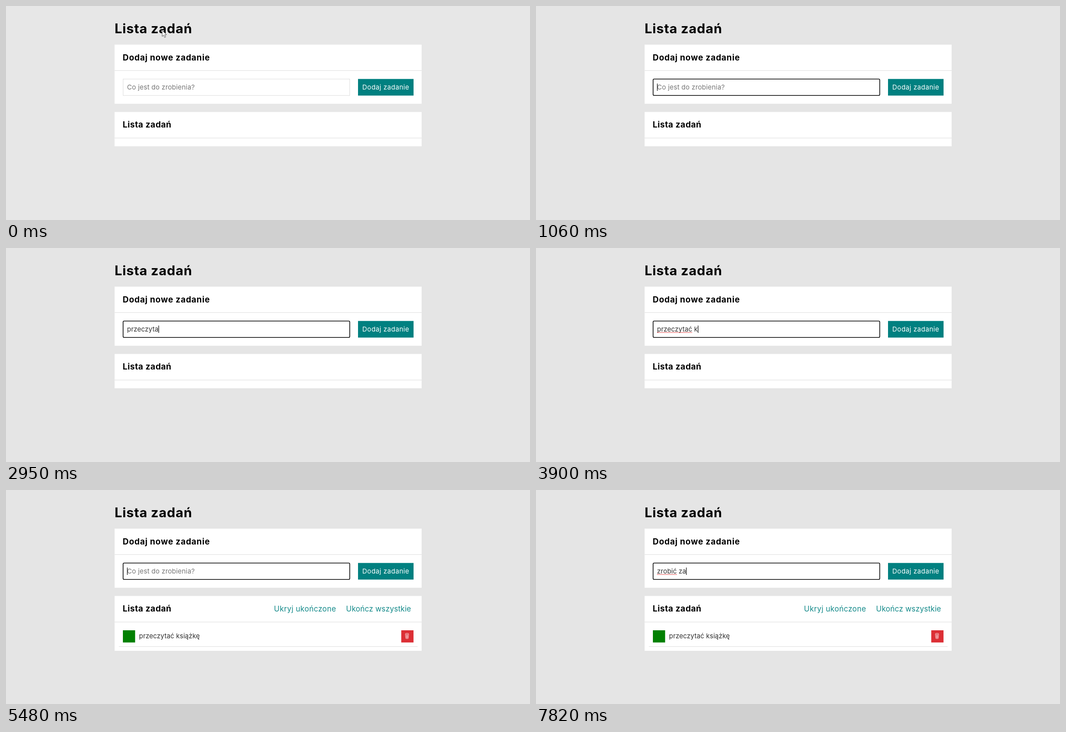
Write an HTML page that moves like this. It is 1170x479 px and loops after 7990 ms.

```html
<!DOCTYPE html>
<html lang="pl">
<head>
<meta charset="utf-8">
<title>Lista zadań</title>
<style>
  html, body { margin: 0; width: 100%; height: 100%; overflow: hidden; background: #e5e5e5; }
  svg { display: block; width: 1170px; height: 479px; }
  text { font: 14.8px Inter, "Noto Sans", sans-serif; font-optical-sizing: none; white-space: pre; }
  .h1, .h2 { font-weight: 700; }
  .h1 { font-size: 29.6px; letter-spacing: .026em; }
  .h2 { font-size: 18.6px; letter-spacing: .026em; }
  .wide { letter-spacing: .038em; }
  .hint { fill: #757575; letter-spacing: .014em; }
  .button { fill: #fff; letter-spacing: .028em; }
  .entry { fill: #333; letter-spacing: .005em; }
  .link { fill: #148a8a; font-size: 16.8px; letter-spacing: .007em; }
  .link.wide { letter-spacing: .022em; }
  .rule { stroke: #ddd; }
</style>
</head>
<body>
<svg viewBox="0 0 1170 479">
  <rect id="page" width="1170" height="479"/>
  <text class="h1" x="242.5" y="60.5">Lista zadań</text>

  <rect x="242.5" y="86.5" width="685.5" height="132.3" fill="#fff"/>
  <text class="h2 wide" x="260.5" y="121.5">Dodaj nowe zadanie</text>
  <path class="rule" d="M242.5 144.5H928"/>
  <rect id="field" x="261.5" y="163.5" width="506" height="36.8" fill="#fff"/>
  <text id="hint" class="hint" x="270.3" y="187.2">Co jest do zrobienia?</text>
  <text id="entry" class="entry" x="270.3" y="187.2"></text>
  <path id="spelling" stroke="#d22" stroke-width="1.2" stroke-dasharray="2 1"/>
  <rect id="caret" y="173.6" width="1.2" height="16.4"/>
  <rect x="786" y="163.3" width="124" height="37.2" fill="#008080"/>
  <text class="button" x="795.5" y="187.2">Dodaj zadanie</text>

  <rect id="list" x="242.5" y="237.2" width="685.5" fill="#fff"/>
  <text class="h2" x="260.5" y="272">Lista zadań</text>
  <path class="rule" d="M242.5 295.5H928"/>
  <g id="task">
    <text class="link wide" x="598.3" y="271.5">Ukryj ukończone</text>
    <text class="link" x="759.3" y="271.5">Ukończ wszystkie</text>
    <rect x="261" y="314" width="27.3" height="27.3" fill="#008000"/>
    <text class="entry" x="297" y="332.2">przeczytać książkę</text>
    <rect x="882.5" y="314" width="27.4" height="27.3" fill="#dc2f35"/>
    <g fill="none" stroke="#fff" stroke-width=".8">
      <ellipse cx="895.4" cy="322.2" rx="3.9" ry="1.3"/>
      <path d="M891.7 323l1 9.3q2.7 1.2 5.4 0l1-9.3M894.2 324l.3 8M896.6 324l-.3 8M892.3 326.6h6.2M892.6 329.4h5.6" stroke-opacity=".85"/>
    </g>
    <path class="rule" d="M252 350.5H919"/>
  </g>
  <path id="pointer" d="M348.8 54.6v13.5l3.1-2.9 2.3 5.2 2.4-1.1-2.3-5h4.3z" fill="#fff" stroke="#444" stroke-width=".9"/>
</svg>
<script>
  const LOOP = 7990;
  const FOCUS = 1060;
  const SUBMIT = 5480;
  const LEFT = 270.3;
  const BLINKS = [[1560, 1700], [6030, 6300]];
  const PHRASES = [
    { text: "przeczytać książkę", from: 0, to: SUBMIT, spellAt: 3670,
      keys: [1700, 1830, 1960, 2120, 2280, 2440, 2620, 2790, 2950, 3350, 3510,
             3830, 3990, 4160, 4320, 4480, 4720, 5050] },
    { text: "zrobić za", from: SUBMIT, to: LOOP, spellAt: 7580,
      keys: [6300, 6475, 6650, 6825, 7000, 7340, 7460, 7700, 7820] }
  ];

  const el = id => document.getElementById(id);
  const set = (id, attrs) => {
    for (const name in attrs) el(id).setAttribute(name, attrs[name]);
  };
  const show = (id, visible) => set(id, { visibility: visible ? "visible" : "hidden" });

  function drawField(focused) {
    set("field", focused
      ? { rx: 2.2, stroke: "#000", "stroke-width": 1.6 }
      : { rx: 0, stroke: "#ddd", "stroke-width": 1 });
  }

  function drawEntry(t) {
    const phrase = PHRASES.find(p => t >= p.from && t < p.to);
    const typed = phrase.text.slice(0, phrase.keys.filter(k => k <= t).length);
    const entry = el("entry");
    if (entry.textContent !== typed) entry.textContent = typed;
    show("hint", !typed);

    const blinkedOff = BLINKS.some(([off, on]) => t >= off && t < on);
    show("caret", t >= FOCUS && !blinkedOff);
    set("caret", { x: LEFT + (typed ? entry.getComputedTextLength() : 0) });

    const misspelt = t >= phrase.spellAt;
    show("spelling", misspelt);
    if (misspelt) {
      const width = entry.getSubStringLength(0, phrase.text.indexOf(" "));
      set("spelling", { d: `M${LEFT} 189.2h${width}` });
    }
  }

  function render(t) {
    set("page", { fill: t < 100 ? "#e7e7e7" : "#e5e5e5" });
    show("pointer", t < 100);
    drawField(t >= FOCUS);
    drawEntry(t);
    show("task", t >= SUBMIT);
    set("list", { height: t >= SUBMIT ? 122.8 : 76.8 });
  }

  const start = performance.now();
  function tick() {
    render((performance.now() - start) % LOOP);
    requestAnimationFrame(tick);
  }
  tick();
</script>
</body>
</html>
```
